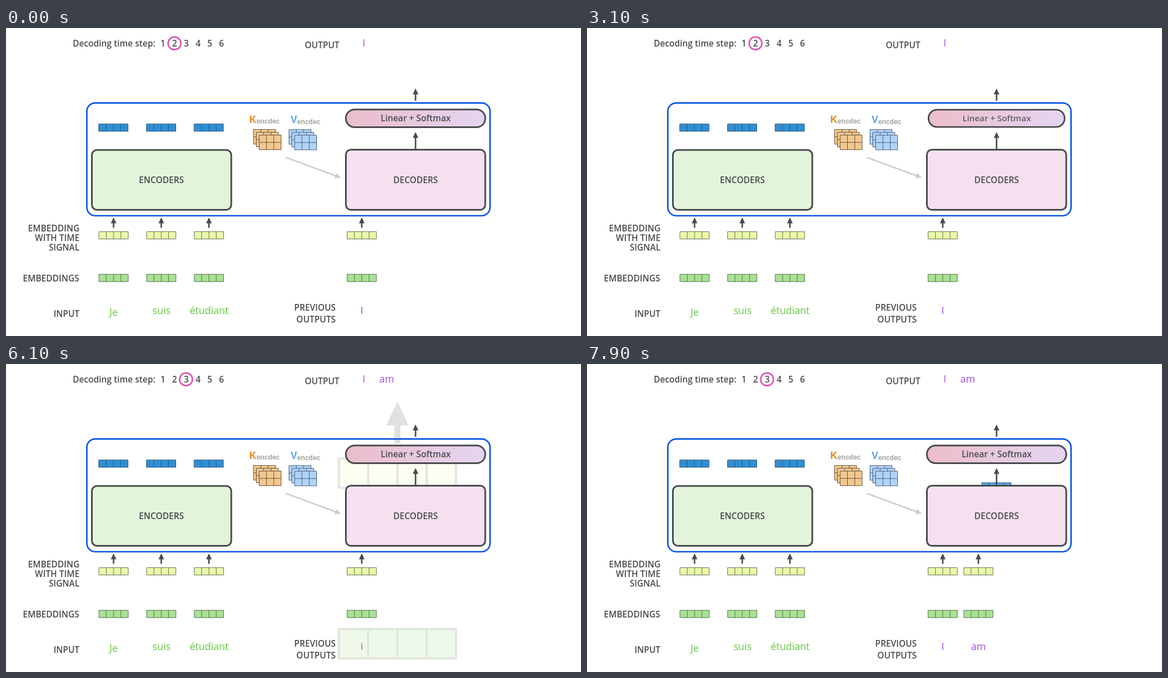
Recreate the animation shown at these times as an HTML page. Size 1021 by 548 pixels, loop 8 s.

```html
<!DOCTYPE html>
<html lang="en">
<head>
<meta charset="utf-8">
<style>
html, body { margin: 0; width: 100%; height: 100%; overflow: hidden; background: #fff; }
svg { display: block; width: 1021px; height: 548px; }
text { font: 600 15.3px "Open Sans", sans-serif; fill: #484b4d; }
.mid { text-anchor: middle; }
.end { text-anchor: end; }
.word { font-weight: 400; font-size: 17.7px; text-anchor: middle; }
.fr { fill: #66c63f; }
.en { fill: #a04fdc; }
.mat { font: 700 17.5px "Liberation Sans", Arial, sans-serif; }
.sub { font: 700 12px "Liberation Sans", Arial, sans-serif; fill: #a0a0a0; }
.box { stroke: #484c4d; stroke-width: 3; }
</style>
</head>
<body>
<svg id="stage" viewBox="0 0 1021 548">
  <defs>
    <linearGradient id="soft"><stop stop-color="#ecbdca"/><stop offset="1" stop-color="#e5d5f2"/></linearGradient>
  </defs>
  <g id="back"></g>
  <g id="incoming"></g>
  <g id="vector"></g>
  <g id="arrows"></g>
  <g id="decoders">
    <rect class="box" x="603.5" y="216.5" width="247.5" height="107" rx="9" fill="#f4e0ef"/>
    <text class="mid" x="727.3" y="276">DECODERS</text>
  </g>
  <g id="softmax">
    <rect class="box" x="603.5" y="145" width="247.5" height="31.5" rx="15.5" fill="url(#soft)"/>
    <text class="mid" x="727.5" y="166">Linear + Softmax</text>
  </g>
  <text id="newWord" class="word en" x="676" y="33">am</text>
  <circle id="ring" cy="27.3" r="11.4" fill="none" stroke="#df5cb4" stroke-width="2.8"/>
</svg>
<script>
const el = id => document.getElementById(id);
const add = (parent, markup) => parent.insertAdjacentHTML('beforeend', markup);
const text = (x, y, str, cls) => `<text x="${x}" y="${y}" class="${cls}">${str}</text>`;

function grid(x, y, w, h, cols, rows, fill, line) {
  let d = `M${x} ${y}h${w}v${h}h${-w}z`;
  for (let i = 1; i < cols; i++) d += `M${x + w * i / cols} ${y}v${h}`;
  for (let i = 1; i < rows; i++) d += `M${x} ${y + h * i / rows}h${w}`;
  return `<path d="${d}" fill="${fill}" stroke="${line}"/>`;
}
const cells = (cx, y, fill, line) => grid(cx - 26, y, 52, 13, 4, 1, fill, line);
const green = cx => cells(cx, 438.2, '#a8e293', '#54704a');
const yellow = cx => cells(cx, 362.3, '#e9faaa', '#697052');

const arrow = (x, tip, end) =>
  `<path d="M${x} ${end}V${tip + 8}" stroke="#484c4d" stroke-width="2.7"/>
   <path d="M${x} ${tip}l5 10.5h-10z" fill="#484c4d"/>`;

function stack(x, y, fill, line) {
  return [0, 5, 10].map(o => grid(x + o, y + o, 39, 26, 3, 2, fill, line)).join('');
}

// Fixed parts
const back = el('back');
add(back, `<rect x="143.5" y="133.3" width="716" height="200.7" rx="15" fill="#fff" stroke="#0b55e2" stroke-width="2.7"/>
  <rect class="box" x="152.5" y="217" width="247.5" height="106.5" rx="9" fill="#e2f5da"/>`);
add(back, text(276, 276, 'ENCODERS', 'mid') + text(118.5, 32.5, 'Decoding time step:', ''));
for (let i = 0; i < 6; i++) add(back, text(278.6 + i * 20.8, 32.5, i + 1, 'mid'));
for (const [x, y, str] of [
  [592, 35.5, 'OUTPUT'], [130.5, 362, 'EMBEDDING'], [130.5, 379, 'WITH TIME'], [130.5, 396, 'SIGNAL'],
  [130, 451, 'EMBEDDINGS'], [130.5, 513.5, 'INPUT'], [585.5, 503.3, 'PREVIOUS'], [585.5, 524.3, 'OUTPUTS']
]) add(back, text(x, y, str, 'end'));
for (const [x, y, str] of [[191, 512, 'Je'], [276, 509, 'suis'], [360.7, 509, 'étudiant']])
  add(back, text(x, y, str, 'word fr'));
add(back, text(635.5, 33, 'I', 'word en') + text(631.8, 508.6, 'I', 'word en'));
for (const x of [191, 275.7, 360.3, 631.7]) {
  add(back, green(x) + yellow(x) + arrow(x, 337, 355.5));
  if (x < 400) add(back, cells(x - .3, 170.8, '#2f8fd4', '#2c5878'));
}
add(back, stack(439.5, 180.5, '#f3c78f', '#68563c') + stack(502.5, 180.8, '#b0d3f8', '#4a5f78'));
add(back, text(432, 168.5, '<tspan fill="#e5881c">K</tspan>', 'mat') + text(444.7, 170, 'encdec', 'sub'));
add(back, text(505.2, 168.8, '<tspan fill="#5ba0ee">V</tspan>', 'mat') + text(516.9, 170.5, 'encdec', 'sub'));
add(back, `<g transform="translate(595 266.5) rotate(20.3)" fill="#cfcfcf">
  <path d="M-105 0H-9" stroke="#cfcfcf" stroke-width="2.7"/><path d="M0 0l-11 -5v10z"/></g>`);

// Moving parts
add(el('incoming'), green(695) + yellow(695) + arrow(695, 337, 355.5) + text(695, 508.6, 'am', 'word en'));
add(el('vector'), cells(727, -6.5, '#56a5e4', '#2c5878'));
add(el('arrows'), arrow(727.2, 107.5, 129.5) + arrow(727.2, 185, 219));

const part = (t, start, len) => Math.min(1, Math.max(0, (t - start) / len));
const smooth = u => u * u * (3 - 2 * u);

// Swell, dip slightly, settle
const swell = [0, .03, .05, -.024, 0];
function pop(id, cy, t, start) {
  const p = part(t, start, 400) * 4, i = Math.min(3, Math.floor(p));
  const s = 1 + swell[i] + (swell[i + 1] - swell[i]) * (p - i);
  const node = el(id);
  node.setAttribute('transform', `translate(727.25 ${cy}) scale(${s}) translate(-727.25 ${-cy})`);
  node.lastElementChild.setAttribute('opacity', s === 1 ? 1 : .85);
}

function draw(t) {
  pop('decoders', 270, t, t < 4000 ? 1000 : 6900);
  pop('softmax', 160.75, t, 2800);

  const rise = smooth(part(t, t < 5000 ? 2000 : 7800, 450));
  el('vector').setAttribute('transform', `translate(0 ${226 - 65 * rise})`);

  el('newWord').setAttribute('opacity', part(t, 3500, 400));
  el('ring').setAttribute('cx', 299.2 + 20.5 * smooth(part(t, 4950, 440)));

  const u = part(t, 5950, 900), s = 1 + 6.25 * (1 - u) ** 4;
  el('incoming').setAttribute('opacity', u);
  el('incoming').setAttribute('transform', `translate(695 427) scale(${s}) translate(-695 -427)`);
}

const begin = performance.now();
function tick() {
  draw((performance.now() - begin) % 8000);
  requestAnimationFrame(tick);
}
tick();
</script>
</body>
</html>
```
